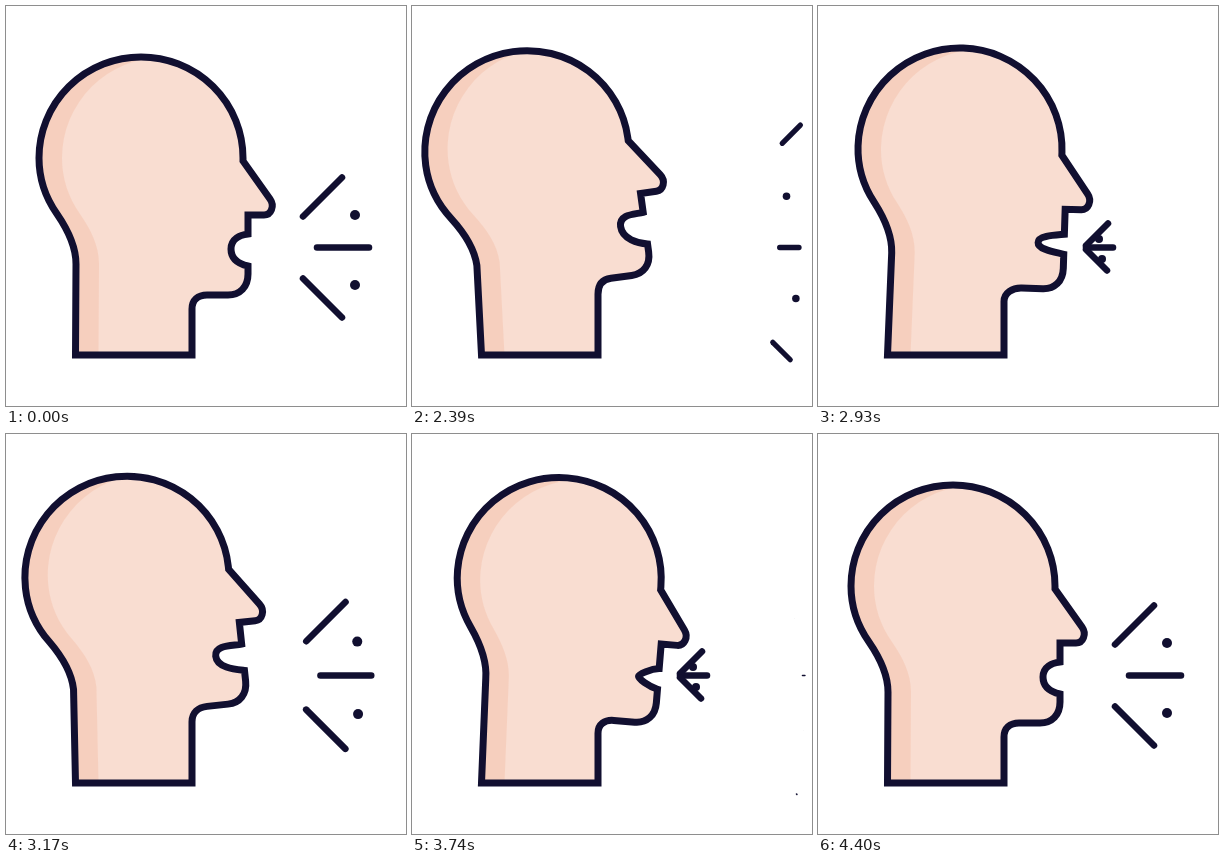
An HTML page with a canvas for the animation above (4.43 s loop, 400x400 px).

```html
<!DOCTYPE html>
<html lang="en">
<head>
<meta charset="utf-8">
<title>Speaking head</title>
<style>
  html, body { margin: 0; height: 100%; overflow: hidden; background: #fff; }
  canvas { display: block; }
</style>
</head>
<body>
<canvas id="stage" width="400" height="400"></canvas>
<script>
const ctx = document.getElementById('stage').getContext('2d');
const LOOP = 4430, STEP = 30, OFFSET = 20;
const INK = '#110f30', SKIN = '#f9ddd1', SHADE = '#f6cfbe';

// Head pose: skull centre, tilt in degrees, mouth depth, inner mouth height, lip closing
const POSE_TIMES = [2030, 2565, 2690, 2800, 2930, 3385, 3500, 3625, 4400];
const POSE = {
  x: [135, 108, 130.5, 147, 142, 108, 130.5, 148, 135],
  y: [152, 143.5, 144, 143, 143, 143.5, 144, 144, 152],
  tilt: [0, -10.5, -3.2, 4.5, 1.8, -10.5, -3.2, 5, 0],
  depth: [0, 11, 12, 7, 9, 11, 12, 4, 0],
  gap: [10, 14, 8, 3, 7, 14, 8, 2, 10],
  close: [0, 0, 0, 6, 6, 0, 0, 6, 0]
};

// Sound marks pass five stages: birth, near, resting, far, gone
const RAYS = [
  { slope: -1, tail: [266, 268, 297, 347, 404], head: [266, 290, 336, 376, 404] },
  { slope: 0, tail: [266, 268, 311, 351, 391], head: [266, 295, 363, 382, 393] },
  { slope: 1, tail: [266, 268, 297, 343, 385], head: [266, 289, 336, 372, 385] }
];
const DOTS = [
  { x: [270, 281, 349, 368, 383], y: [240, 233, 209, 195, 184] },
  { x: [270, 284, 349, 377, 392], y: [243, 253, 279, 289, 297] }
];
const RAY_WIDTH = [2, 6.5, 6.5, 6.5, 1.5];
const DOT_RADIUS = [0, 4, 5, 5, 0];
const BURSTS = [
  { stage: 2, times: [2030, 2280, 2620] },
  { stage: 0, times: [2870, 2930, 3150, 3410, 3770] },
  { stage: 0, times: [3680, 3740, 4400] }
];

// Monotone cubic through the keys, at rest on both ends
function spline(times, values, t) {
  const last = times.length - 1;
  if (t <= times[0]) return values[0];
  if (t >= times[last]) return values[last];
  const slope = i => (values[i + 1] - values[i]) / (times[i + 1] - times[i]);
  const tangent = i => {
    if (i === 0 || i === last) return 0;
    const a = slope(i - 1), b = slope(i);
    return a * b > 0 ? 2 * a * b / (a + b) : 0;
  };
  const i = times.findIndex(k => k > t) - 1;
  const span = times[i + 1] - times[i], u = (t - times[i]) / span, w = 1 - u;
  return values[i] * (1 + 2 * u) * w * w + values[i + 1] * u * u * (3 - 2 * u)
    + span * u * w * (tangent(i) * w - tangent(i + 1) * u);
}

function drawHead(t) {
  const pose = {};
  for (const key in POSE) pose[key] = spline(POSE_TIMES, POSE[key], t);
  const { x: cx, y: cy, tilt, depth, gap, close } = pose;
  const sin = Math.sin(tilt * Math.PI / 180), cos = Math.cos(tilt * Math.PI / 180);
  const place = (x, y) => [cx + (x - 135) * cos - (y - 152) * sin, cy + (x - 135) * sin + (y - 152) * cos];
  const p = (x, y) => place(x, y).join(' ') + ' ';

  const back = d => `M${69.5 + d} 349L${p(70 + d, 258)}
    C${p(70 + d, 240)}${p(62 + d, 224)}${p(51 + d, 208)}
    C${p(39 + d, 191)}${p(33 + d, 172)}${p(33 + d, 152)}
    A102 101 ${tilt} 0 1 ${p(237 + d, 152)}`;
  const inner = 225 - depth, mid = 243 + Math.min(0, tilt / 2);
  const throat = place(186, 303)[1];
  const outline = new Path2D(`${back(0)}L${p(237, 155)}L${p(264, 193)}
    C${p(269, 200)}${p(265, 209)}${p(258, 209)}L${p(242, 209)}L${p(242, 228 + close)}
    C${p(234, 229 + close)}${p(inner, mid - gap)}${p(inner, mid)}
    C${p(inner, mid + gap)}${p(233, 258 - close)}${p(242, 260 - close)}
    L${p(242, 268)}C${p(242, 281)}${p(234, 289)}${p(222, 289)}L${p(201, 289)}
    C${p(192, 289)}186 ${throat - 9} 186 ${throat}L186 349Z`);

  ctx.fillStyle = SHADE;
  ctx.fill(outline);
  ctx.save();
  ctx.clip(outline);
  ctx.fillStyle = SKIN;
  ctx.fill(new Path2D(back(23) + 'L400 349Z'));
  ctx.restore();
  ctx.lineWidth = 7;
  ctx.stroke(outline);
}

function drawBurst({ stage, times }, t) {
  const at = values => spline(times, values.slice(stage, stage + times.length), t);
  ctx.lineWidth = at(RAY_WIDTH);
  for (const { slope, tail, head } of RAYS) {
    ctx.beginPath();
    for (const x of [at(tail), at(head)]) ctx.lineTo(x, 241.5 + slope * (x - 266));
    ctx.stroke();
  }
  ctx.fillStyle = INK;
  for (const { x, y } of DOTS) {
    ctx.beginPath();
    ctx.arc(at(x), at(y), at(DOT_RADIUS), 0, 2 * Math.PI);
    ctx.fill();
  }
}

function draw(now) {
  const t = Math.floor((now % LOOP - OFFSET) / STEP) * STEP + OFFSET;
  ctx.fillStyle = '#fff';
  ctx.fillRect(0, 0, 400, 400);
  ctx.strokeStyle = INK;
  ctx.lineCap = 'round';
  drawHead(t);
  BURSTS.forEach((burst, i) => {
    const started = i === 0 || t > burst.times[0];
    if (started && t <= burst.times[burst.times.length - 1]) drawBurst(burst, t);
  });
}

const start = performance.now();
function frame() {
  draw(performance.now() - start);
  requestAnimationFrame(frame);
}
frame();
</script>
</body>
</html>
```
